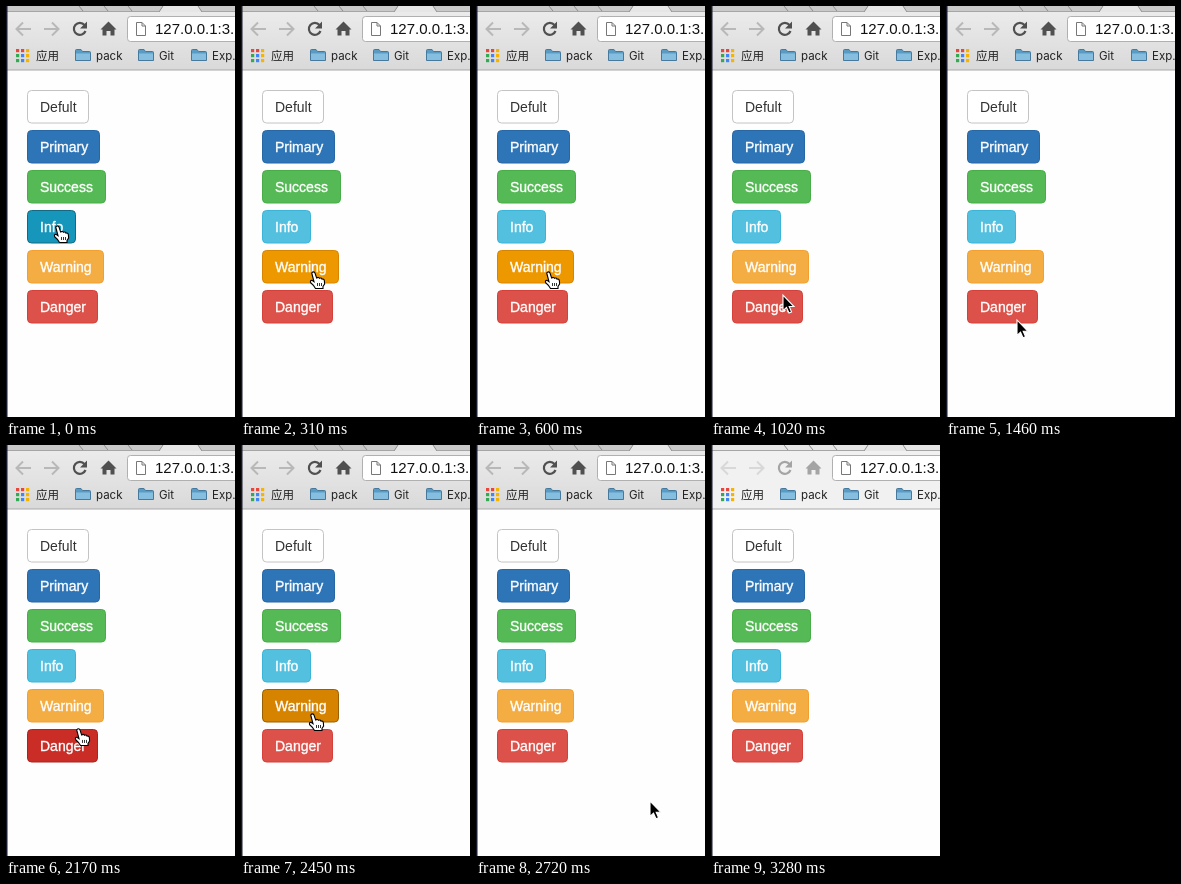
An HTML page that plays this animation: 229x411 px, repeating every 3320 ms.

```html
<!DOCTYPE html>
<html>
<head>
<meta charset="utf-8">
<style>
  html, body { margin: 0; width: 100%; height: 100%; overflow: hidden; background: #fefefe; }
  svg { display: block; width: 229px; height: 411px; }
  .mark { font: 11.5px Inter, "Noto Sans CJK SC", "Noto Sans CJK", sans-serif; fill: #222; }
  .url { font: 15px "Liberation Sans", sans-serif; fill: #111; }
  .btn text { font: 14px "Liberation Sans", sans-serif; }
  .bar { fill: url(#chrome); }
  .tool { fill: none; stroke: #505050; stroke-width: 2.2; }
  .home { fill: #505050; }
  .nav { fill: none; stroke: #b8b8b8; stroke-width: 2; }
  .idle .bar { fill: #f1f1f1; }
  .idle .tool { stroke: #a4a4a4; }
  .idle .home { fill: #a4a4a4; }
  .idle .nav { stroke: #d8d8d8; }
  .idle .strip { fill: #e6e6e6; }
</style>
</head>
<body>
<svg id="stage" viewBox="0 0 229 411">
  <defs>
    <linearGradient id="chrome" x2="0" y2="1">
      <stop stop-color="#ebebeb"/><stop offset="1" stop-color="#d9d9d9"/>
    </linearGradient>
    <g id="folder">
      <path d="M.5 11.5V1.5Q.5.5 1.5.5H6L7.5 2.5H14.5Q15.5 2.5 15.5 3.5V11.5Z" fill="#5a9bc4" stroke="#46799c"/>
      <path d="M1 4.5H15V11H1Z" fill="#86bedf"/>
    </g>
  </defs>

  <rect width="229" height="411" fill="#fefefe"/>
  <rect class="strip" width="229" height="6" fill="#c9c9c9"/>
  <path d="M153 6L157 0H192L196 6Z" fill="#e6e6e6"/>
  <path d="M73 0L77 5M98 0L102 5M122 0L126 5M153 6L157 0M192 0L196 6" fill="none" stroke="#8e8e8e"/>
  <rect class="bar" y="6" width="229" height="58"/>
  <path d="M0 5.5H153M196 5.5H229" stroke="#a5a5a5"/>
  <path d="M0 64H229" stroke="#a9a9a9"/>

  <path class="nav" d="M25 23H11M17 16.5L10.5 23L17 29.500M38 23H52M46 16.500L52.500 23L46 29.500"/>
  <path class="tool" d="M78.500 19A6 6 0 1 0 79.500 25"/>
  <path class="home" d="M81 15.500V22.500H74ZM94.500 23.500L102.500 15.500L110.500 23.500H108.500V29.500H104.500V25H100.500V29.500H96.500V23.500Z"/>

  <rect x="121.500" y="10.500" width="120" height="25" rx="3" fill="#fff" stroke="#b0b0b0"/>
  <path d="M130.500 16.500H136L139.500 20V29.500H130.500ZM136 16.500V20H139.500" fill="#fff" stroke="#777"/>
  <text class="url" x="149" y="28">127.0.0.1:3.</text>

  <g id="apps"></g>
  <text class="mark" x="30" y="54">应用</text>
  <g id="marks"></g>
  <rect width="1.500" height="411" fill="#15192b"/>

  <g id="buttons"></g>

  <g id="cursor">
    <path id="arrow" d="M0 0V15.500L3.500 12.200L6 17.800L8.600 16.700L6.200 11.300H11Z" fill="#000" stroke="#fff" stroke-width="1.100"/>
    <g id="hand" stroke="#000">
      <path d="M-1.300 1Q.5 -1.300 2 1L3.600 6Q5.500 4.700 6.500 6.300Q8.300 5.400 9 7.200Q11 6.600 11.400 8.800L11.600 12L10 14.500V16.500H2.500Q.5 13 -2.300 10.800Q-3.300 8.200 -1 8.400L1 9.800Z" fill="#fff" stroke-width="1.100"/>
      <path d="M4.500 11V14M6.500 11V14M8.500 11V14" stroke-width=".8"/>
    </g>
  </g>
</svg>

<script>
const LOOP = 3320, LAG = 35;
const $ = id => document.getElementById(id);

["#e8453c", "#e8453c", "#f4b400", "#34a853", "#4285f4", "#f4b400", "#34a853", "#4285f4", "#f4b400"]
  .forEach((color, i) => {
    $("apps").innerHTML += `<rect x="${10 + i % 3 * 5}" y="${43 + (i / 3 | 0) * 5}" width="3.2" height="3.2" fill="${color}"/>`;
  });

[[69, "pack"], [132, "Git"], [185, "Exp."]].forEach(([x, name]) => {
  $("marks").innerHTML += `<use href="#folder" x="${x}" y="43"/><text class="mark" x="${x + 21}" y="54">${name}</text>`;
});

// label, width, then [fill, border] for rest, hover and press
const buttons = [
  ["Defult", 61, ["#fff", "#c4c4c4"], ["#e6e6e6", "#adadad"], ["#d4d4d4", "#8c8c8c"]],
  ["Primary", 72, ["#2e75b8", "#2867a5"], ["#22609a", "#1c4f80"], ["#1d4f80", "#122b40"]],
  ["Success", 78, ["#55ba55", "#47ad47"], ["#3f9d40", "#348036"], ["#358038", "#255625"]],
  ["Info", 48, ["#53c0e0", "#3ab5d8"], ["#22afd5", "#1798bd"], ["#1796bb", "#126a83"]],
  ["Warning", 76, ["#f4ad42", "#f1a030"], ["#ee9800", "#d78500"], ["#d68400", "#9a5f00"]],
  ["Danger", 70, ["#dc5149", "#d5403a"], ["#c92d26", "#aa2520"], ["#aa2620", "#761815"]]
].map(([label, w, ...looks], i) => {
  const y = 84.5 + 40 * i, ink = i ? "#fff" : "#333";
  $("buttons").insertAdjacentHTML("beforeend",
    `<g class="btn"><rect x="21.5" y="${y}" width="${w}" height="32.5" rx="4"/>
     <text x="34" y="${y + 21.5}" fill="${ink}" stroke="${ink}" stroke-width="${i ? .35 : 0}">${label}</text></g>`);
  return { y, w, looks, rect: $("buttons").lastElementChild.firstElementChild };
});

// time, x, y of the pointer tip
const path = [
  [0, 51, 220], [90, 51, 220], [210, 63, 247], [300, 72, 266],
  [930, 72, 266], [1020, 72, 289], [1130, 71, 312], [1250, 70, 321],
  [1459, 70, 321], [1460, 71, 314], [1520, 71, 313],
  [2030, 71, 313], [2170, 72, 284], [2400, 71, 269],
  [2560, 71, 269], [2620, 95, 290], [2720, 174, 356], [LOOP, 174, 356]
];
const presses = [[0, 90], [490, 600], [1730, 1850], [2450, 2540]];

function tip(t) {
  t = Math.max(0, t);
  const i = path.findIndex(p => p[0] > t);
  const [t0, x0, y0] = path[i - 1], [t1, x1, y1] = path[i];
  const k = (t - t0) / (t1 - t0);
  return [x0 + (x1 - x0) * k, y0 + (y1 - y0) * k];
}

function draw(t) {
  const [x, y] = tip(t);
  const [hx, hy] = tip(t - LAG);
  const shown = t < 2750;
  const down = presses.some(([a, b]) => t >= a && t < b);
  let over = false;
  for (const b of buttons) {
    const hit = shown && hx >= 21 && hx <= 22 + b.w && hy >= b.y - .5 && hy <= b.y + 33;
    const [fill, border] = b.looks[hit ? (down ? 2 : 1) : 0];
    b.rect.setAttribute("fill", fill);
    b.rect.setAttribute("stroke", border);
    over = over || hit;
  }
  $("cursor").setAttribute("transform", `translate(${x} ${y})`);
  $("cursor").style.display = shown ? "" : "none";
  $("hand").style.display = over ? "" : "none";
  $("arrow").style.display = over ? "none" : "";
  $("stage").classList.toggle("idle", t >= 3280);
}

const start = performance.now();
function frame() {
  draw((performance.now() - start) % LOOP);
  requestAnimationFrame(frame);
}
frame();
</script>
</body>
</html>
```
